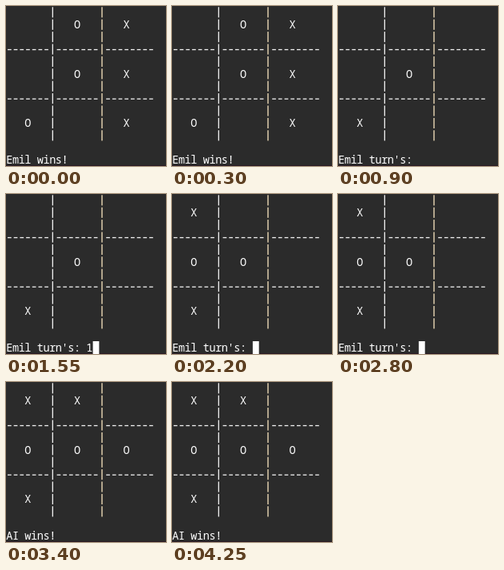
Animation of 200 by 200 pixels, one loop 4.35 s. Source, as an HTML page with a canvas:

```html
<!DOCTYPE html>
<html lang="en">
<head>
<meta charset="utf-8">
<style>
  html, body { margin: 0; width: 100%; height: 100%; overflow: hidden; background: #2b2b2b; }
  canvas { display: block; }
</style>
</head>
<body>
<canvas id="stage" width="200" height="200"></canvas>
<script>
const ctx = document.getElementById('stage').getContext('2d');
const LOOP = 4350, CELL_W = 7.7, CELL_H = 15.4, LEFT = 0.5, STATUS_ROW = 12;
const PROMPT = "Emil turn's: ";

// Each state holds from `at` on; `cursor` is the caret column.
const states = [
  { at: 0,    board: ' OX OXO X', text: 'Emil wins!' },
  { at: 600,  board: '      X  ', text: '', cursor: 0 },
  { at: 800,  board: '    O X  ', text: PROMPT, cursor: 13 },
  { at: 1350, board: '    O X  ', text: PROMPT + '1', cursor: 14 },
  { at: 1600, board: 'X   O X  ', text: '', cursor: 0 },
  { at: 1750, board: 'X  OO X  ', text: PROMPT, cursor: 13 },
  { at: 2950, board: 'X  OO X  ', text: PROMPT + '2', cursor: 14 },
  { at: 3050, board: 'XX OO X  ', text: '', cursor: 0 },
  { at: 3200, board: 'XX OOOX  ', text: 'AI wins!' }
];

// A key press restarts the caret blink.
const keyTimes = [600, 1350, 1600, 2950, 3050];
const BLINK = 300;

const lastBefore = (list, t) => list.filter(v => v <= t).pop();
const cellX = col => LEFT + col * CELL_W;

function rect(x, y, w, h, color) {
  ctx.fillStyle = color;
  ctx.fillRect(x, y, w, h);
}

function write(text, row, col) {
  ctx.fillStyle = '#fff';
  [...text].forEach((ch, i) =>
    ctx.fillText(ch, cellX(col + i + 0.5), 12.6 + row * CELL_H));
}

function drawGrid() {
  for (let row = 0; row < 11; row++) {
    const y = row * CELL_H + 1.3;
    rect(57.7, y, 1.3, 13.1, '#f0f0f0');
    rect(119.3, y, 1.4, 13.1, '#ead9b5');
  }
  for (const y of [53.9, 115.5])
    for (let col = 0; col < 24; col++)
      if (col % 8 !== 7 || col === 23) rect(cellX(col) + 1.5, y, 4.7, 1.3, '#f0f0f0');
}

function draw(t) {
  const { board, text, cursor } = states.filter(s => s.at <= t).pop();
  rect(0, 0, 200, 200, '#2b2b2b');
  rect(0, 199, 200, 1, '#2b1a24');
  ctx.font = '13.6px "Noto Sans Mono", monospace';
  ctx.textAlign = 'center';
  drawGrid();
  [...board].forEach((mark, i) =>
    write(mark, 1 + 4 * Math.floor(i / 3), 3 + 8 * (i % 3)));
  write(text, STATUS_ROW, 0);
  if (cursor !== undefined) {
    const phase = Math.floor((t - lastBefore(keyTimes, t)) / BLINK);
    if (phase % 2 === 0) rect(cellX(cursor) + 0.3, 184, 7.8, 16, '#fff');
  }
}

function tick() {
  draw(performance.now() % LOOP);
  requestAnimationFrame(tick);
}
tick();
</script>
</body>
</html>
```
